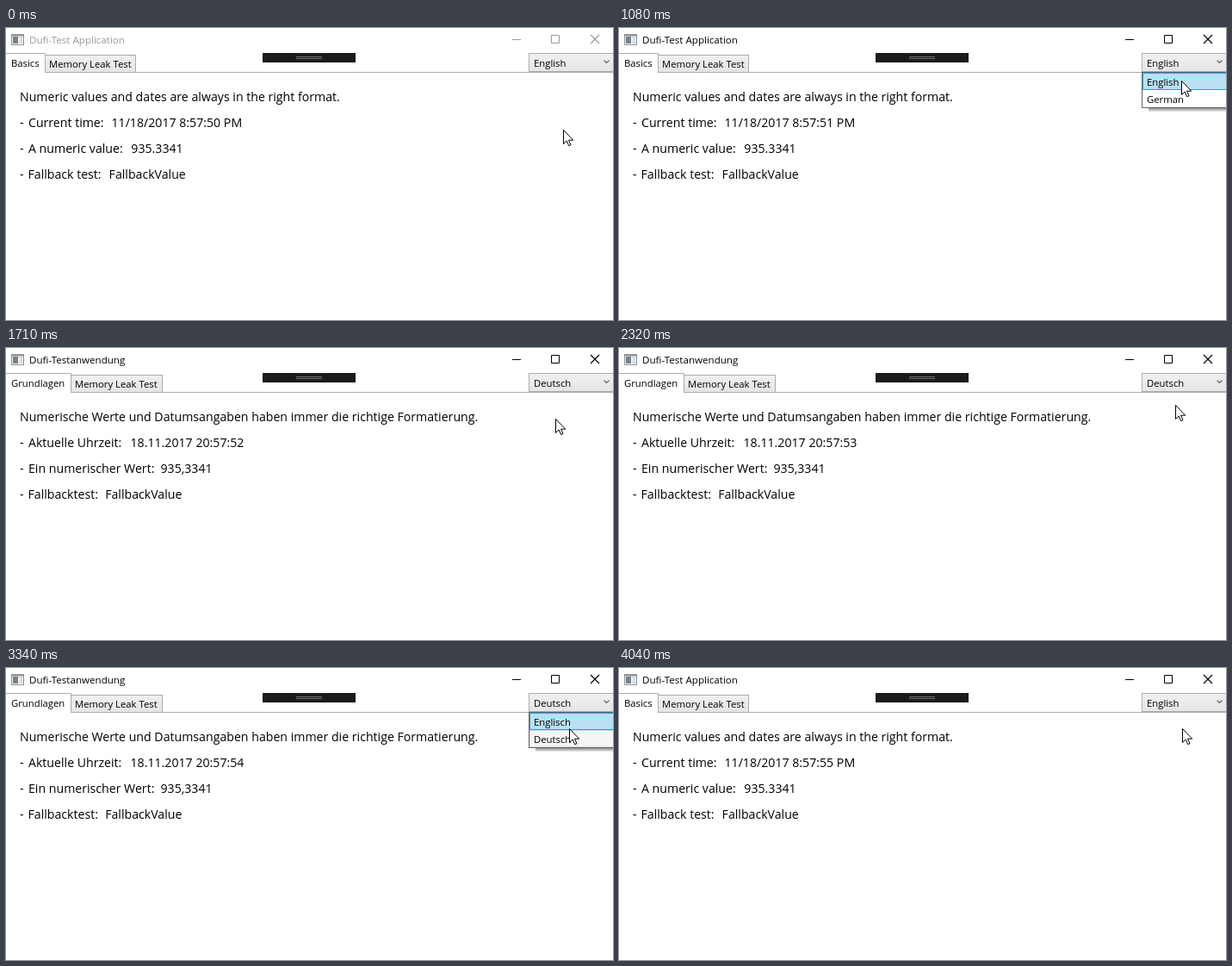
Write an HTML page that moves like this. It is 705x339 px and loops after 4.27 s.

```html
<!DOCTYPE html>
<html lang="en">
<head>
<meta charset="utf-8">
<title>Language switch</title>
<style>
  html, body { margin: 0; width: 100%; height: 100%; overflow: hidden; background: #fff; }
  svg { display: block; width: 705px; height: 339px; }
  text { font: 11.3px "Open Sans", "Noto Sans", sans-serif; fill: #000; white-space: pre; }
  #title { font-size: 11.6px; }
  .body text { font-size: 14.15px; }
  .line { fill: none; stroke: #acacac; }
</style>
</head>
<body>
<svg viewBox="0 0 705 339">
  <defs>
    <linearGradient id="grey" x2="0" y2="1"><stop stop-color="#f0f0f0"/><stop offset="1" stop-color="#e5e5e5"/></linearGradient>
    <linearGradient id="blue" x2="0" y2="1"><stop stop-color="#ecf4fc"/><stop offset="1" stop-color="#dcecfc"/></linearGradient>
    <linearGradient id="shade" x2="0" y2="1"><stop stop-color="#000" stop-opacity=".45"/><stop offset="1" stop-color="#000" stop-opacity=".08"/></linearGradient>
    <clipPath id="below"><rect x="600" y="51" width="105" height="60"/></clipPath>
  </defs>
  <rect width="705" height="339" fill="#fff"/>

  <g>
    <rect x="6.5" y="7.5" width="14" height="12" fill="#f4f4f4" stroke="#8f9295"/>
    <path d="M6 8.5H21" stroke="#8f9295" stroke-width="2"/>
    <rect x="8" y="10" width="6" height="8" fill="#74838f"/>
    <path d="M15.5 11.5H19.5M15.5 14H19.5M15.5 16.5H19.5" stroke="#b9c3cb"/>
  </g>
  <text id="title" x="27" y="18"/>
  <g id="buttons" fill="none">
    <path d="M588 13.5H598M633.5 8.5H642.5V17.5H633.5Z"/>
    <path d="M679 8L689 18M689 8L679 18" stroke-width="1.2"/>
  </g>

  <path class="line" d="M0 51.5H705"/>
  <rect id="tab2" y="31.5" height="20" fill="url(#grey)" stroke="#acacac"/>
  <rect id="tab1" x="-.5" y="29.5" height="24" fill="#fff"/>
  <path id="tab1Edge" class="line"/>
  <text id="tab1Name" x="6" y="45"/>
  <text id="tab2Name" y="46">Memory Leak Test</text>

  <rect x="298" y="29" width="108" height="11" fill="#1b1b1c"/>
  <path d="M337 33.5H367M337 35.5H367" stroke="#6c6c6e"/>

  <g class="body">
    <text id="intro" x="16" y="85"/>
    <text x="16" y="115">-</text><text id="label0" x="26" y="115"/><text id="value0" y="115"/>
    <text x="16" y="145">-</text><text id="label1" x="26" y="145"/><text id="value1" y="145"/>
    <text x="16" y="175">-</text><text id="label2" x="25.5" y="175"/><text id="value2" y="175">FallbackValue</text>
  </g>

  <rect id="combo" x="607.5" y="29.5" width="100" height="21"/>
  <text id="choice" x="613" y="45"/>
  <path id="arrow" d="M694.5 37.8L697.5 40.4L700.5 37.8" fill="none" stroke-width="1.4"/>

  <g clip-path="url(#below)">
    <g id="popup">
      <rect x="615" y="93" width="90" height="4" fill="url(#shade)"/>
      <rect x="607.5" y="51.5" width="105" height="41" fill="#fff" stroke="#646464"/>
      <rect id="current" x="608.5" width="105" height="19" fill="#f5f5f5" stroke="#dadada"/>
      <rect id="mark" x="608.5" width="105" height="19" stroke="#26a0da"/>
      <text id="item0" x="613" y="67"/>
      <text id="item1" x="613" y="87"/>
    </g>
  </g>

  <path id="cursor" d="M.5 .5V16.5L4.2 13L6.7 18.7L9 17.7L6.5 12.2H11.7Z" fill="#fff" stroke="#000"/>
</svg>
<script>
const LOOP = 4270;
const el = {};
document.querySelectorAll("svg [id]").forEach(node => el[node.id] = node);

const english = {
  title: "Dufi-Test Application", tab: "Basics", tabEnd: 45, tab2End: 151,
  intro: "Numeric values and dates are always in the right format.",
  labels: ["Current time:", "A numeric value:", "Fallback test:"],
  valueX: [122.5, 145.3, 119.6], number: "935.3341",
  clock: s => `11/18/2017 8:57:${s} PM`,
  languages: ["English", "German"], selected: 0
};
const german = {
  title: "Dufi-Testanwendung", tab: "Grundlagen", tabEnd: 75, tab2End: 182,
  intro: "Numerische Werte und Datumsangaben haben immer die richtige Formatierung.",
  labels: ["Aktuelle Uhrzeit:", "Ein numerischer Wert:", "Fallbacktest:"],
  valueX: [144.5, 179.5, 115.2], number: "935,3341",
  clock: s => `18.11.2017 20:57:${s}`,
  languages: ["Englisch", "Deutsch"], selected: 1
};

// Held values: [start time, value]
const seconds = [[0, 50], [320, 51], [1320, 52], [2320, 53], [3340, 54], [4040, 55]];
const language = [[0, english], [1710, german], [3970, english]];
const popupHeight = [[0, 0], [700, 24], [780, 42], [1710, 0], [2870, 16], [2950, 33], [3020, 42], [3970, 0]];

// Pointer moves: first step, last step, step count, destination
const moves = [
  [80, 320, 4, 661, 49],
  [1080, 1390, 5, 638, 82],
  [2320, 2320, 1, 646, 66],
  [2410, 2790, 6, 665, 43],
  [3190, 3340, 3, 654, 70]
];

const held = (keys, t) => keys.filter(([start]) => start <= t).pop()[1];

function pointer(t) {
  let x = 647, y = 118;
  for (const [start, end, count, toX, toY] of moves) {
    if (t < start) break;
    const gap = (end - start) / Math.max(1, count - 1);
    const step = t >= end ? count : Math.floor((t - start) / gap) + 1;
    const k = step / count, eased = k * (2 - k);
    x = Math.round(x + (toX - x) * eased);
    y = Math.round(y + (toY - y) * eased);
  }
  return [x, y];
}

function set(id, attrs) {
  for (const name in attrs) el[id].setAttribute(name, attrs[name]);
}

function write(id, text) {
  if (el[id].textContent !== text) el[id].textContent = text;
}

function draw(t) {
  const ui = held(language, t);
  const [x, y] = pointer(t);
  const ink = t < 620 ? "#999" : "#000";

  write("title", ui.title);
  el.title.style.fill = ink;
  set("buttons", { stroke: ink });

  write("tab1Name", ui.tab);
  set("tab1", { width: ui.tabEnd + .5 });
  set("tab1Edge", { d: `M0 29.5H${ui.tabEnd + .5}V52` });
  set("tab2", { x: ui.tabEnd + .5, width: ui.tab2End - ui.tabEnd - 1 });
  set("tab2Name", { x: ui.tabEnd + 5 });

  write("intro", ui.intro);
  ui.labels.forEach((label, i) => {
    write("label" + i, label);
    set("value" + i, { x: ui.valueX[i] });
  });
  write("value0", ui.clock(held(seconds, t)));
  write("value1", ui.number);

  const hover = y >= 29 && y < 51;
  set("combo", { fill: hover ? "url(#blue)" : "url(#grey)", stroke: hover ? "#7eb4ea" : "#acacac" });
  set("arrow", { stroke: hover ? "#000" : "#707070" });
  write("choice", ui.languages[ui.selected]);

  const height = held(popupHeight, t);
  const marked = y < 52 ? ui.selected : y < 72 ? 0 : 1;
  set("popup", { visibility: height ? "visible" : "hidden", transform: `translate(0 ${height - 42})` });
  set("current", { y: 52.5 + 20 * ui.selected });
  set("mark", { y: 52.5 + 20 * marked, fill: y < 52 ? "#c5e6f5" : "#b9e0f3" });
  ui.languages.forEach((name, i) => write("item" + i, name));

  set("cursor", { transform: `translate(${x} ${y})` });
}

const begin = performance.now();
function tick() {
  draw((performance.now() - begin) % LOOP);
  requestAnimationFrame(tick);
}
tick();
</script>
</body>
</html>
```
